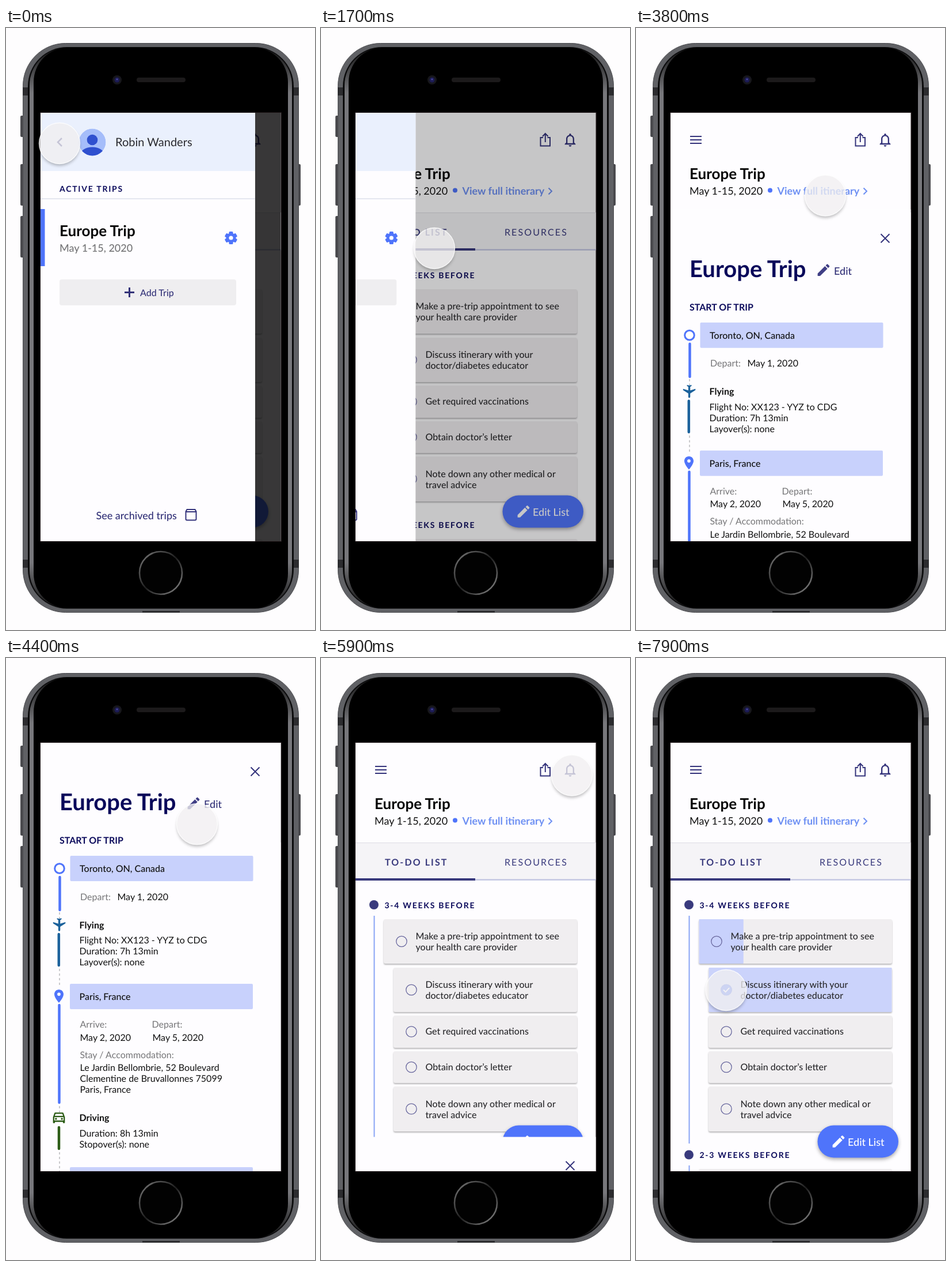
These frames come from a looping animation (537x1044 px, 8 s). An HTML page:

```html
<!DOCTYPE html>
<html lang="en">
<head>
<meta charset="utf-8">
<title>Trip planner prototype</title>
<style>
  html, body { margin: 0; width: 100%; height: 100%; overflow: hidden; background: #fefdfe; }
  svg { display: block; width: 100%; height: 100%; }
  text { font: 16px Lato, Carlito, sans-serif; fill: #111; text-rendering: geometricPrecision; }
  .h1 { font-size: 40px; font-weight: 700; fill: #08075a; }
  .h2 { font-size: 26px; font-weight: 700; fill: #060606; }
  .s18 { font-size: 18px; }
  .s20 { font-size: 20px; fill: #2b2b30; }
  .b { font-weight: 700; }
  .m { font-weight: 500; }
  .gray { fill: #757577; }
  .navy { fill: #343379; }
  .deep { fill: #0c0b5c; }
  .link { fill: #6e90f3; }
  .white { fill: #fff; }
  .task { font-weight: 500; fill: #2b2b2e; }
  .cap { font-size: 14px; font-weight: 700; letter-spacing: 1.75px; fill: #0c0b5c; }
  .tab { letter-spacing: 2.1px; fill: #393a7d; }
  .icon { fill: none; stroke: #35347c; stroke-width: 2; }
  .card { fill: #f0eef0; filter: drop-shadow(0 2px 1px #0004); }
  .fab { filter: drop-shadow(0 3px 3px #0005); }
  .soft { filter: blur(2.5px); }
</style>
</head>
<body>
<svg viewBox="0 0 537 1044" preserveAspectRatio="none">
  <defs>
    <clipPath id="screenClip"><rect x="60" y="147" width="417.5" height="743"/></clipPath>
    <clipPath id="avatarClip"><circle cx="150" cy="198" r="23.5"/></clipPath>
    <mask id="aroundDisc" maskUnits="userSpaceOnUse" x="-60" y="-60" width="120" height="120">
      <rect x="-60" y="-60" width="120" height="120" fill="#fff"/><circle r="35.5"/>
    </mask>
    <linearGradient id="rim" x2="0" y2="1">
      <stop offset="0" stop-color="#111"/><stop offset=".08" stop-color="#77777b"/>
      <stop offset=".92" stop-color="#77777b"/><stop offset="1" stop-color="#111"/>
    </linearGradient>
    <linearGradient id="ring" x2="1" y2="1">
      <stop offset=".1" stop-color="#6c6c6c"/><stop offset=".5" stop-color="#1e1e1e"/>
      <stop offset=".9" stop-color="#787878"/>
    </linearGradient>
  </defs>
  <g id="phone"></g>
  <g clip-path="url(#screenClip)">
    <g id="main"></g>
    <rect id="shade" x="60" y="147" width="418" height="743"/>
    <g id="drawer"></g>
    <g id="modal"></g>
  </g>
  <g id="cursor">
    <g mask="url(#aroundDisc)"><circle class="soft" cy="4" r="35" fill-opacity=".25"/></g>
    <circle r="35.5" fill="#f1f0f1" fill-opacity=".77" stroke="#fff" stroke-opacity=".8" stroke-width="1.4"/>
  </g>
</svg>
<script>
const $ = id => document.getElementById(id);
const BLUE = '#4f74fb', NAVY = '#393a7d', PALE = '#c8d1fc', PAPER = '#fefdff';

const rect = (x, y, w, h, fill, extra = '') =>
  `<rect x="${x}" y="${y}" width="${w}" height="${h}" fill="${fill}" ${extra}/>`;
const dot = (x, y, r, fill, extra = '') => `<circle cx="${x}" cy="${y}" r="${r}" fill="${fill}" ${extra}/>`;
const text = (x, y, str, cls = '') => `<text x="${x}" y="${y}" class="${cls}">${str}</text>`;
const line = (d, color, width, extra = '') =>
  `<path d="${d}" fill="none" stroke="${color}" stroke-width="${width}" ${extra}/>`;
const stroke = d => `<path class="icon" d="${d}"/>`;
// 24-unit glyph centred on x, y
const glyph = (x, y, d, fill, scale = 1.15, turn = 0) =>
  `<path transform="translate(${x} ${y}) rotate(${turn}) scale(${scale}) translate(-12 -12)" d="${d}" fill="${fill}" fill-rule="evenodd"/>`;

const PENCIL = 'M3 17.25V21h3.75L17.81 9.94l-3.75-3.75zM20.71 7.04c.39-.39.39-1.02 0-1.41l-2.34-2.34c-.39-.39-1.02-.39-1.41 0l-1.83 1.83 3.75 3.75z';
const BELL = 'M12 22c1.1 0 2-.9 2-2h-4c0 1.1.9 2 2 2zM18 16v-5c0-3.07-1.63-5.64-4.5-6.32V4a1.5 1.5 0 0 0-3 0v.68C7.64 5.36 6 7.92 6 11v5l-2 2v1h16v-1zM16 17H8v-6c0-2.48 1.51-4.5 4-4.5s4 2.02 4 4.5z';
const PLANE = 'M21 16v-2l-8-5V3.5a1.5 1.5 0 0 0-3 0V9l-8 5v2l8-2.5V19l-2 1.5V22l3.5-1 3.5 1v-1.5L13 19v-5.5z';
const PIN = 'M12 2C8.13 2 5 5.13 5 9c0 5.25 7 13 7 13s7-7.75 7-13c0-3.87-3.13-7-7-7zM12 11.5a2.5 2.5 0 1 1 0-5 2.5 2.5 0 0 1 0 5z';
const CAR = 'M18.92 5C18.7 4.4 18.2 4 17.5 4h-11C5.8 4 5.3 4.4 5.08 5L3 11v8q0 1 1 1h1q1 0 1-1v-1h12v1q0 1 1 1h1q1 0 1-1v-8zM6.85 6h10.3l1 3H5.8zM19 16H5v-5h14zM7.5 12a1.5 1.5 0 1 0 .01 0zM16.5 12a1.5 1.5 0 1 0 .01 0z';

function phone() {
  const button = (x, y, h) => rect(x, y, 6, h, '#4a4a4e', 'rx="2"');
  const bands = [103, 922].map(y => rect(29, y, 9, 14, '#2c2c2f') + rect(500, y, 9, 14, '#2c2c2f')).join('');
  return button(25, 152, 37) + button(25, 236, 72) + button(25, 326, 72) + button(506, 236, 72)
    + rect(29.5, 26.5, 479, 987, '#606165', 'rx="74" stroke="#4a4a4e"') + bands
    + rect(38, 33, 462, 974, '#0b0b0c', 'rx="68"')
    + rect(41, 35, 456, 970, 'url(#rim)', 'rx="64"')
    + rect(48, 34, 442, 972, '#000', 'rx="60"')
    + rect(237, 1011, 65, 3, '#2b2b2e')
    + dot(193, 90, 8, '#17171c') + dot(193, 90, 4.5, '#1d1c55') + dot(193, 89, 1.5, '#4a4aa0')
    + rect(227, 86, 85, 8, '#1c1a1b', 'rx="4"')
    + dot(269, 945, 37, '#020202', 'stroke="url(#ring)" stroke-width="2.6"')
    + rect(59, 146, 420, 745, '#1d1517');
}

const tasks = [
  { x: 109, y: 453, h: 77, lines: ['Make a pre-trip appointment to see', 'your health care provider'] },
  { x: 126, y: 537, h: 77, lines: ['Discuss itinerary with your', 'doctor/diabetes educator'] },
  { x: 126, y: 620, h: 56, lines: ['Get required vaccinations'] },
  { x: 126, y: 682, h: 55, lines: ['Obtain doctor’s letter'] },
  { x: 126, y: 743, h: 78, lines: ['Note down any other medical or', 'travel advice'] }
];

function taskCard({ x, y, h, lines }, i) {
  const cy = y + h / 2, first = cy + (lines.length > 1 ? -3.5 : 5.2);
  return rect(x, y, 445 - x, h, '', 'rx="3" class="card"')
    + rect(x + .5, y, 444 - x, h, PALE, `id="fill${i}" rx="1"`)
    + dot(x + 31, cy, 9.2, 'none', 'stroke="#6a699f" stroke-width="1.3"')
    + lines.map((s, k) => text(x + 55.5, first + k * 19.2, s, 'task')).join('');
}

function mainView() {
  const section = (y, label) => dot(92, y, 8, NAVY) + text(110.5, y + 5.5, label, 'cap');
  return rect(60, 147, 418, 743, PAPER)
    + stroke('M94 188h20M94 194h20M94 200h20')
    + stroke('M386 190h-4.5v14.5h16.5v-14.5h-4.5M389.8 198v-14M385 188l4.8-5 4.8 5')
    + glyph(433, 194, BELL, '#35347c', 1.17)
    + text(93, 261.5, 'Europe Trip', 'h2') + text(93, 288.5, 'May 1-15, 2020', 's18')
    + dot(233, 281.5, 4, BLUE) + text(245.5, 288.5, 'View full itinerary', 's18 b link')
    + line('M395.5 277.5l5.5 5.5-5.5 5.5', '#6e90f3', 2)
    + rect(60, 320, 418, 64, '#f5f4f7') + rect(60, 320, 418, 1, '#dcdce3')
    + rect(268, 383.5, 210, 2.2, '#bec2e0') + rect(60, 382, 208, 4, NAVY)
    + text(111, 360, 'TO-DO LIST', 'tab b') + text(319, 360, 'RESOURCES', 'tab')
    + section(428, '3-4 WEEKS BEFORE') + section(861.5, '2-3 WEEKS BEFORE')
    + line('M92.5 447V842M92.5 880V890', '#87a4f5', 2)
    + tasks.map(taskCard).join('') + rect(109, 886, 336, 40, '', 'rx="3" class="card"')
    + `<g id="check">${dot(157, 575.5, 9.8, BLUE)}${line('M152 575.5l3.6 3.6 6.6-7', '#fff', 2)}</g>`
    + rect(315.5, 810.5, 140.5, 56, BLUE, 'rx="28" class="fab"')
    + glyph(352, 838.5, PENCIL, '#fff') + text(368, 846, 'Edit List', 's18 m white');
}

function drawerView() {
  const teeth = [0, 60, 120].map(a => rect(387.5, 353, 7, 22, BLUE, `rx="1.5" transform="rotate(${a} 391 364)"`)).join('');
  return rect(60, 147, 373, 743, PAPER) + rect(60, 147, 373, 101, '#eaf0fd')
    + line('M97 191l-7 7 7 7', '#35347c', 2.5)
    + `<g clip-path="url(#avatarClip)">${dot(150, 198, 23.5, '#a5bdfa')}${dot(150, 194, 9.3, '#2f50cf')}`
    + `<ellipse cx="150" cy="220" rx="21" ry="13.5" fill="#2f50cf"/></g>`
    + text(190, 205, 'Robin Wanders', 's20')
    + text(93, 283.5, 'ACTIVE TRIPS', 'cap') + rect(60, 295.5, 373, 1.2, '#d6d9e6')
    + rect(60, 314, 7.5, 99, BLUE)
    + text(93, 361, 'Europe Trip', 'h2') + text(93, 388, 'May 1-15, 2020', 's18 m gray')
    + teeth + dot(391, 364, 8.5, BLUE) + dot(391, 364, 3.6, PAPER)
    + rect(93, 436, 307, 45, '#efeef0', 'rx="4"')
    + line('M206 458.5h17M214.5 450v17', '#343379', 3)
    + text(233, 465, 'Add Trip', 'm navy')
    + text(156.5, 852, 'See archived trips', 's18 m navy')
    + stroke('M314.5 835h14l2 3.5v13q0 2-2 2h-14q-2 0-2-2v-13zM312.5 839h18');
}

function modalView() {
  const bar = (x, y1, y2, color) => line(`M${x} ${y1}V${y2}`, color, 4.5, 'stroke-linecap="round"');
  const place = (x, y, name) => rect(x, y, 318, 44, PALE, 'rx="2"') + text(x + 16.5, y + 28, name, 'm');
  const rows = (x, y, ...lines) => lines.map((s, i) => text(x, y + i * 19, s)).join('');
  const TEAL = '#1b619b', GREEN = '#2c5c16';
  return rect(60, 147, 418, 743, PAPER)
    + stroke('M425.5 189.5l15 15M440.5 189.5l-15 15')
    + text(93, 264, 'Europe Trip', 'h1')
    + glyph(326, 252, PENCIL, '#403f85') + text(344, 260, 'Edit', 's18 m navy')
    + text(93, 322, 'START OF TRIP', 'b deep')
    + line('M93 441V452M93 539V570M93 777V788M93 857V890', '#c9c9cc', 2, 'stroke-dasharray="4 4"')
    + dot(93, 365, 8.3, PAPER, `stroke="${BLUE}" stroke-width="3"`)
    + bar(93.5, 380, 437, BLUE) + bar(91.8, 479, 533, TEAL) + bar(92.5, 602, 771, BLUE) + bar(92, 814, 851, GREEN)
    + glyph(92, 462.5, PLANE, TEAL, 1.13, 180) + glyph(92, 586.5, PIN, BLUE) + glyph(92, 797.5, CAR, GREEN)
    + place(111.5, 343, 'Toronto, ON, Canada')
    + text(129, 419.5, 'Depart:', 'gray') + text(193.5, 419.5, 'May 1, 2020')
    + text(127.5, 468.5, 'Flying', 'b')
    + rows(127.5, 495, 'Flight No: XX123 - YYZ to CDG', 'Duration: 7h 13min', 'Layover(s): none')
    + place(111, 565, 'Paris, France')
    + text(128.5, 641, 'Arrive:', 'gray') + text(253.5, 641, 'Depart:', 'gray')
    + text(128.5, 663.5, 'May 2, 2020') + text(254.5, 663.5, 'May 5, 2020')
    + text(128.5, 693.5, 'Stay / Accommodation:', 'gray')
    + rows(128.5, 716, 'Le Jardin Bellombrie, 52 Boulevard', 'Clementine de Bruvallonnes 75099', 'Paris, France')
    + text(127.5, 802.5, 'Driving', 'b')
    + rows(127.5, 829.5, 'Duration: 8h 13min', 'Stopover(s): none')
    + rect(111, 883, 318, 44, PALE, 'rx="2"');
}

$('phone').innerHTML = phone();
$('main').innerHTML = mainView();
$('drawer').innerHTML = drawerView();
$('modal').innerHTML = modalView();
tasks.forEach((_, i) => { if (i > 1) $('fill' + i).remove(); });

const ease = (t, start, dur) => {
  const p = Math.min(1, Math.max(0, (t - start) / dur));
  return p < .5 ? 2 * p * p : 1 - 2 * (1 - p) ** 2;
};

// Cursor moves: start, duration, destination and optional bend point
const home = [93, 200];
const moves = [
  { at: 200, dur: 850, to: [197, 382] },
  { at: 2500, dur: 633, to: [329, 290.5], via: [288, 353] },
  { at: 4300, dur: 850, to: [436, 203.5] },
  { at: 6350, dur: 850, to: [156.5, 576] }
];

function cursorAt(t) {
  let from = home;
  for (const { at, dur, to, via } of moves) {
    const s = ease(t, at, dur);
    if (s < 1) return from.map((a, i) => {
      const bend = via ? via[i] : (a + to[i]) / 2;
      return (1 - s) ** 2 * a + 2 * s * (1 - s) * bend + s * s * to[i];
    });
    from = to;
  }
  return from;
}

function render(t) {
  const closed = ease(t, 1387, 500);
  $('drawer').setAttribute('transform', `translate(${-373 * closed} 0)`);
  $('shade').setAttribute('opacity', .78 * (1 - closed));

  const raised = ease(t, 3468, 500) - ease(t, 5500, 500);
  $('modal').setAttribute('transform', `translate(0 ${743 * (1 - raised)})`);

  const done = ease(t, 7500, 500);
  $('fill0').setAttribute('width', 84 * done);
  $('fill1').setAttribute('opacity', done);
  $('check').setAttribute('opacity', done);

  $('cursor').setAttribute('transform', `translate(${cursorAt(t)})`);
}

const LOOP = 8000, STEP = 100;
const began = performance.now();
function tick() {
  const t = (performance.now() - began) % LOOP;
  render(Math.floor(t / STEP) * STEP);
  requestAnimationFrame(tick);
}
tick();
</script>
</body>
</html>
```
